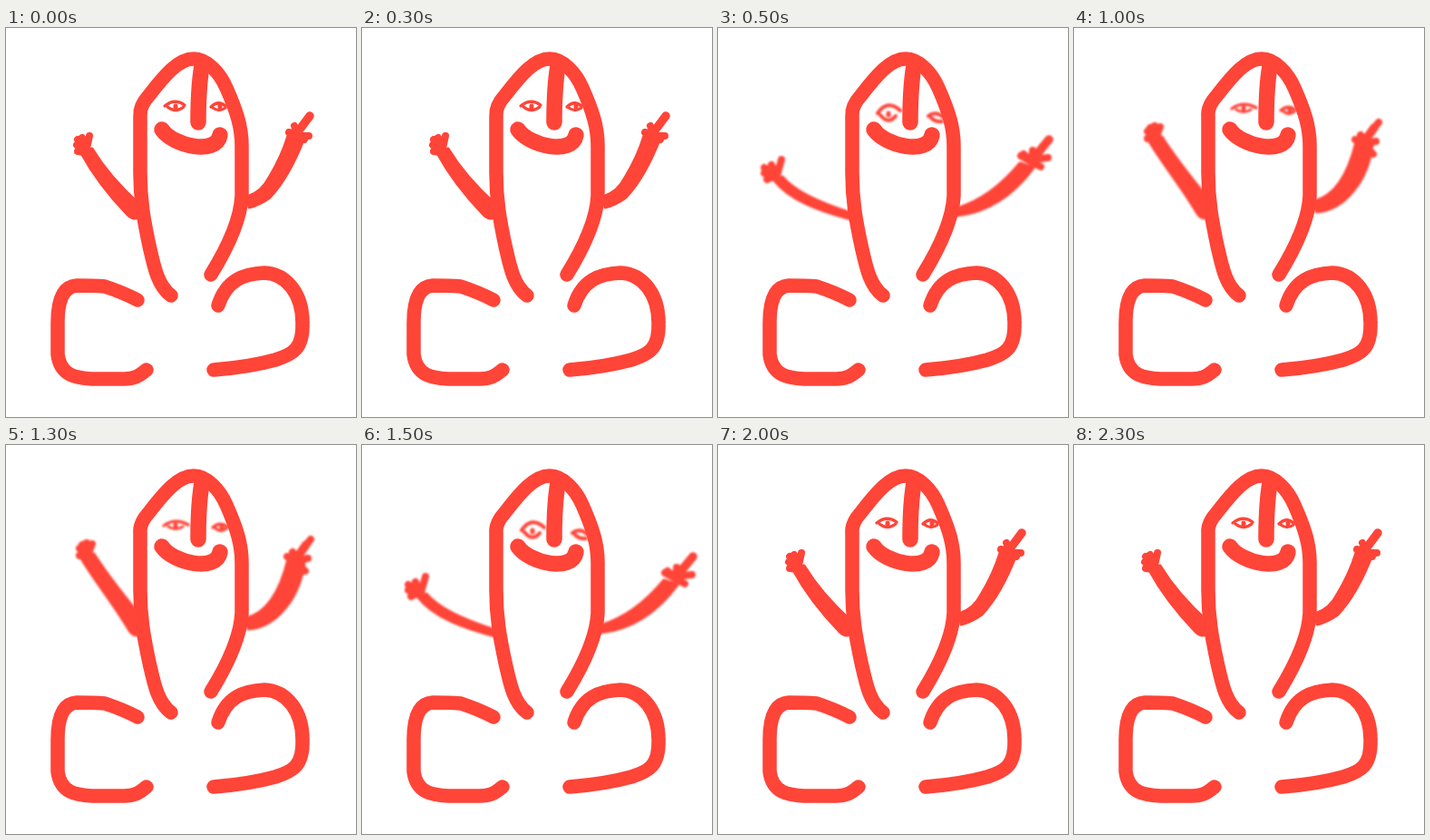
An HTML page for the animation above (2500 ms loop, 386x429 px).

```html
<!DOCTYPE html>
<html lang="en">
<head>
<meta charset="utf-8">
<title>Waving doodle</title>
<style>
  html, body { margin: 0; width: 100%; height: 100%; overflow: hidden; background: #fff; }
  svg { display: block; width: 386px; height: 429px; }
  path { fill: none; stroke: #ff4438; stroke-linecap: round; stroke-linejoin: round; }
  .body { stroke-width: 15.5; }
  .face { stroke-width: 17.5; }
  .arm { fill: #ff4438; stroke-width: 3; }
  .hand { stroke-width: 8; }
  .point { stroke-width: 9.5; }
  .eye { stroke-width: 3.2; }
  .pupil { stroke-width: 5; }
  .soft { filter: blur(.8px); }
</style>
</head>
<body>
<svg viewBox="0 0 386 429">
  <path class="body" d="M182 295C167 284 163 262 158 240C152 212 148 190 148 160V97Q147 86 158 74C175 52 190 34 207 34C222 34 236 50 243 66C255 93 260 110 260 130V185C259 207 247 238 226 272"/>
  <path class="body" d="M145 300Q130 292 109 285Q96 284 78 284C62 285 57 303 57 325V360C60 384 78 386 95 387H130C145 387 149 381 155 377"/>
  <path class="body" d="M234 306C243 278 262 271 285 270C310 271 327 294 327 325C328 354 316 360 297 366Q268 374 229 377"/>
  <path class="face" d="M216 42C213 60 212 78 212 104"/>
  <path class="face" d="M172 112C184 130 232 141 236 118"/>

  <g class="pose">
    <path class="arm" d="M83 138L95 133C107 153 128 177 148 195L146 209Q140 212 134 206C112 183 96 162 83 138Z"/>
    <path class="hand" d="M88 134L79 123M89 133L84 121M89 133L92 119M87 134L78 129M87 137L79 136"/>
    <path class="arm" d="M266 186Q282 181 290 165Q304 142 311 119L329 121C319 147 307 170 291 187Q280 195 268 198Z"/>
    <path class="point" d="M320 117L335 97"/>
    <path class="hand" d="M322 116L318 108M320 117L312 115M322 119L334 119M321 119L329 123"/>
    <path class="eye" d="M175 86Q186 77 197 85M178 87Q187 94 196 87M226 87Q234 79 242 86M228 88Q235 93 242 88"/>
    <path class="pupil" d="M187 86V87M236 86V87"/>
  </g>

  <g class="pose soft">
    <path class="arm" d="M62 168L71 164C84 180 112 193 147 204V211C113 202 79 190 62 168Z"/>
    <path class="hand" d="M64 163L51 154M64 163L59 151M65 163L70 145M63 162L51 160M63 163L54 167"/>
    <path class="arm" d="M263 199C290 191 314 172 333 149L348 154C326 184 298 203 263 207Z"/>
    <path class="point" d="M346 146L365 123"/>
    <path class="hand" d="M347 145L347 135M345 146L337 139M345 147L334 141M347 145L364 143M346 148L356 153"/>
    <path class="eye" style="stroke-width:4" d="M176 94Q187 78 201 91M179 96Q188 107 196 97M232 97Q240 91 248 98M235 99Q240 104 247 103"/>
    <path class="pupil" d="M188 94V96"/>
  </g>

  <g class="pose soft">
    <path class="arm" d="M83 125L97 120C112 144 130 166 147 187V209Q140 212 135 203C118 174 97 149 83 125Z"/>
    <path class="hand" d="M90 119L84 110M90 119L89 108M91 120L95 109M89 120L81 114M88 121L81 122"/>
    <path class="arm" d="M264 191C287 186 302 163 311 126L329 129C324 168 299 201 267 203Z"/>
    <path class="point" d="M321 124L331 110"/>
    <path class="hand" d="M329 113L336 104M321 127L316 118M320 126L310 123M322 127L333 125M321 130L330 139"/>
    <path class="eye" d="M174 89Q187 80 201 88M179 90Q187 95 195 90M228 91Q236 84 244 90M231 92Q237 97 243 92"/>
    <path class="pupil" d="M187 88V89M238 90V91"/>
  </g>
</svg>
<script>
  const poses = document.querySelectorAll('.pose');
  const order = [0, 1, 2, 1, 0];
  const stepMs = 500;

  function draw() {
    const current = order[Math.floor(performance.now() / stepMs) % order.length];
    poses.forEach((pose, i) => { pose.style.display = i === current ? '' : 'none'; });
    requestAnimationFrame(draw);
  }
  draw();
</script>
</body>
</html>
```
